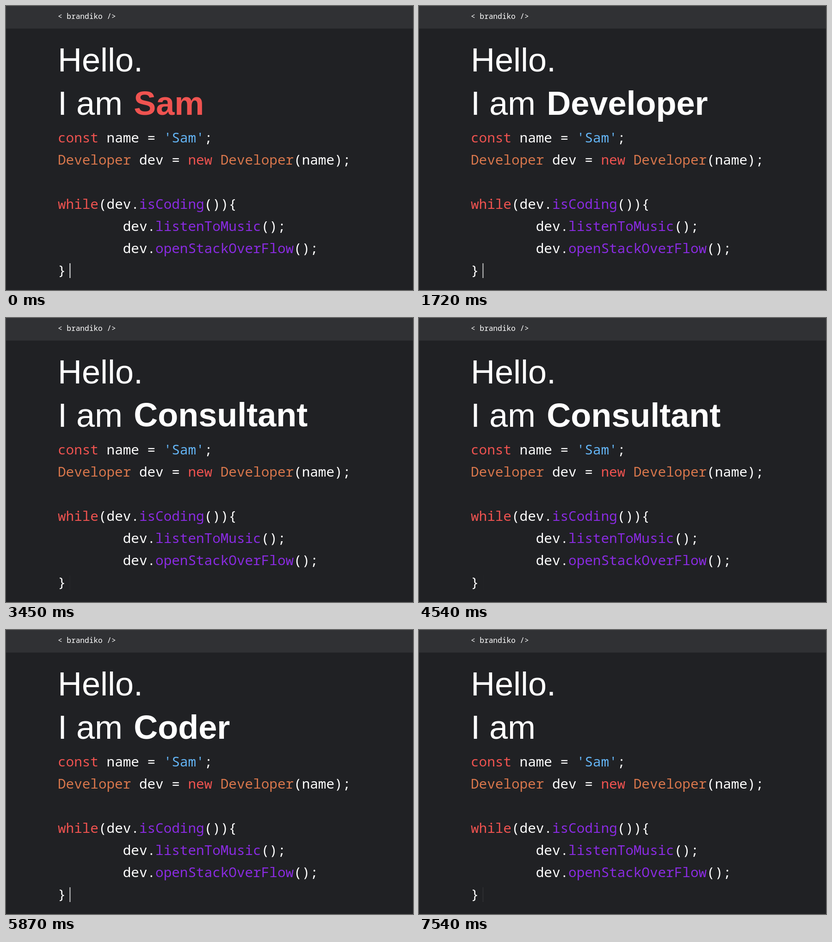
Animation, 880 px wide and 616 px high, one loop 7610 ms. Source, as an HTML page:

```html
<!DOCTYPE html>
<html lang="en">
<head>
<meta charset="utf-8">
<title>Hello</title>
<style>
  html, body { margin: 0; width: 100%; height: 100%; overflow: hidden; background: #202124; }
  svg { display: block; width: 880px; height: 616px; }
  text { fill: #fff; white-space: pre; }
  .big { font: 72px "Liberation Sans", Arial, sans-serif; }
  .bold { font-weight: bold; }
  .code { font: 29.32px "Noto Sans Mono", monospace; }
  .brand { font: 500 16.13px "Noto Sans Mono", monospace; }
  .red { fill: #ef5350; }
  .blue { fill: #64b5f6; }
  .type { fill: #d9774c; }
  .call { fill: #8a2be2; }
</style>
</head>
<body>
<svg viewBox="0 0 880 616">
  <clipPath id="mask"><rect x="270" y="167" width="600" height="94"/></clipPath>
  <rect width="880" height="49" fill="#303134"/>
  <text class="brand" x="112" y="28">&lt; brandiko /&gt;</text>
  <text class="big" x="112" y="142">Hello.</text>
  <text class="big" x="112" y="236">I am</text>
  <g clip-path="url(#mask)" class="big bold">
    <text class="word red" x="276.3">Sam</text>
    <text class="word" x="276.3">Developer</text>
    <text class="word" x="276.3">Consultant</text>
    <text class="word" x="276.3">Coder</text>
  </g>
  <g class="code">
    <text x="112" y="296"><tspan class="red">const</tspan> name = <tspan class="blue">'Sam'</tspan>;</text>
    <text x="112" y="344"><tspan class="type">Developer</tspan> dev = <tspan class="red">new</tspan> <tspan class="type">Developer</tspan>(name);</text>
    <text x="112" y="440"><tspan class="red">while</tspan>(dev.<tspan class="call">isCoding</tspan>()){</text>
    <text x="112" y="488">        dev.<tspan class="call">listenToMusic</tspan>();</text>
    <text x="112" y="536">        dev.<tspan class="call">openStackOverFlow</tspan>();</text>
    <text x="112" y="584">}</text>
  </g>
  <rect id="cursor" x="137.4" y="558" width="2" height="32" fill="#fff"/>
</svg>
<script>
const LOOP = 7610, FIRST = 1073, INTERVAL = 2062;
const BLINK = 1035, PEAK = 975;
const BASELINE = 236, HEIGHT = 94;
const words = document.querySelectorAll('.word');
const cursor = document.getElementById('cursor');

// Damped spring from 0 to 1: stiffness 340, damping 30.
function spring(ms) {
  if (ms <= 0) return 0;
  const s = ms / 1000, decay = 15, freq = Math.sqrt(340 - decay * decay);
  return 1 - Math.exp(-decay * s) * (Math.cos(freq * s) + decay / freq * Math.sin(freq * s));
}

// CSS "ease": cubic-bezier(.25, .1, .25, 1).
function ease(x) {
  const curve = (a, b, u) => 3 * a * u * (1 - u) ** 2 + 3 * b * u * u * (1 - u) + u ** 3;
  let lo = 0, hi = 1;
  for (let i = 0; i < 20; i++) {
    const mid = (lo + hi) / 2;
    if (curve(.25, .25, mid) < x) lo = mid; else hi = mid;
  }
  return curve(.1, 1, lo);
}

function draw(t) {
  words.forEach((word, i) => {
    const leave = spring(t - FIRST - i * INTERVAL);
    const enter = i ? spring(t - FIRST - (i - 1) * INTERVAL) : 1;
    word.setAttribute('y', BASELINE + HEIGHT * (1 - enter - leave));
    // A word that has left stays hidden.
    word.style.visibility = enter > 0 && leave < .99 ? 'visible' : 'hidden';
  });
  const phase = (t - PEAK + BLINK) % BLINK / BLINK * 2;
  cursor.setAttribute('opacity', phase < 1 ? 1 - ease(phase) : ease(phase - 1));
}

const start = performance.now();
function tick() {
  draw((performance.now() - start) % LOOP);
  requestAnimationFrame(tick);
}
tick();
</script>
</body>
</html>
```
